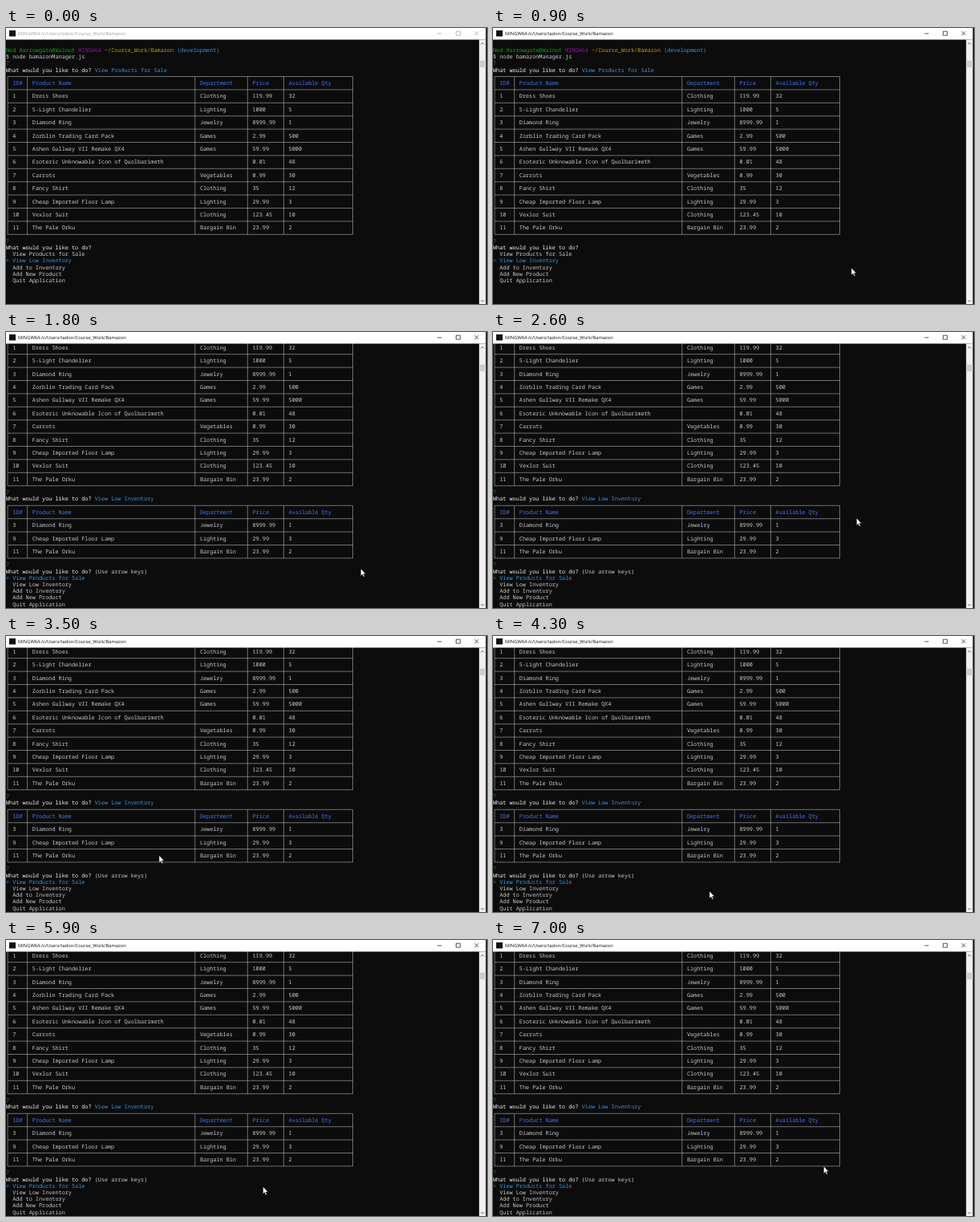
An HTML page that plays this animation: 600 px wide and 344 px high, repeating every 7100 ms.

```html
<!DOCTYPE html>
<html lang="en">
<head>
<meta charset="utf-8">
<title>Terminal inventory manager</title>
<style>
  html, body { margin: 0; width: 100%; height: 100%; overflow: hidden; background: #0c0c0c; }
  svg { display: block; width: 600px; height: 344px; }
  text { white-space: pre; text-rendering: geometricPrecision; }
  .mono { font: 6.833px "Noto Sans Mono", "DejaVu Sans Mono", monospace; }
  .title { font: 5.81px "Open Sans", "Noto Sans", sans-serif; }
</style>
</head>
<body>
<svg id="stage" viewBox="0 0 600 344"></svg>
<script>
const CELL = 4.1, ROW = 8.2, TOP = 27.7, LOOP = 7100, FOCUS_AT = 700, SCROLL_AT = 1800;
const WHITE = '#f2f2f2', GREY = '#cccccc', GREEN = '#13a10e', CYAN = '#3a96dd',
      BLUE = '#3b78ff', PURPLE = '#881798', YELLOW = '#c19c00';
const stage = document.getElementById('stage');

function add(parent, tag, attrs = {}, text = '') {
  const el = document.createElementNS('http://www.w3.org/2000/svg', tag);
  for (const key in attrs) el.setAttribute(key, attrs[key]);
  el.textContent = text;
  return parent.appendChild(el);
}

const lineY = line => TOP + line * ROW;
const put = (parent, line, col, text, fill) =>
  add(parent, 'text', { x: col * CELL, y: lineY(line) + 2.3, fill, class: 'mono' }, text);

const HEAD = ['ID#', 'Product Name', 'Department', 'Price', 'Available Qty'];
const PRODUCTS = [
  ['Dress Shoes', 'Clothing', '119.99', '32'],
  ['5-Light Chandelier', 'Lighting', '1000', '5'],
  ['Diamond Ring', 'Jewelry', '8999.99', '1'],
  ['Zorblin Trading Card Pack', 'Games', '2.99', '500'],
  ['Ashen Gullway VII Remake QX4', 'Games', '59.99', '5000'],
  ['Esoteric Unknowable Icon of Quolbarimeth', '', '0.01', '48'],
  ['Carrots', 'Vegetables', '0.99', '30'],
  ['Fancy Shirt', 'Clothing', '35', '12'],
  ['Cheap Imported Floor Lamp', 'Lighting', '29.99', '3'],
  ['Vexlor Suit', 'Clothing', '123.45', '10'],
  ['The Pale Orku', 'Bargain Bin', '23.99', '2']
].map((item, i) => [String(i + 1), ...item]);
const MENU = ['View Products for Sale', 'View Low Inventory', 'Add to Inventory',
              'Add New Product', 'Quit Application'];

function table(parent, line, items) {
  const edges = [0.5, 6.5, 57.5, 73.5, 84.5, 105.5].map(c => c * CELL);
  const rows = [HEAD, ...items];
  let d = '';
  for (let i = 0; i <= rows.length; i++) d += `M${edges[0]} ${lineY(line + 2 * i)}H${edges[5]}`;
  for (const x of edges) d += `M${x} ${lineY(line)}V${lineY(line + 2 * rows.length)}`;
  add(parent, 'path', { d, stroke: GREY, 'stroke-width': 0.52, fill: 'none' });
  rows.forEach((row, i) => row.forEach((text, j) =>
    put(parent, line + 1 + 2 * i, [2, 8, 59, 75, 86][j], text, i ? GREY : BLUE)));
}

function question(parent, line, answer = '', fill = CYAN) {
  put(parent, line, 0, '?', GREEN);
  put(parent, line + 1, 0, 'What would you like to do?', WHITE);
  put(parent, line + 1, 27, answer, fill);
}

function menu(parent, line, selected) {
  MENU.forEach((text, i) => {
    const on = i === selected;
    put(parent, line + i, 0, (on ? '> ' : '  ') + text, on ? CYAN : GREY);
  });
}

// Terminal contents
add(stage, 'rect', { width: 600, height: 344, fill: '#0c0c0c' });
const screen = add(stage, 'g');
put(screen, 0, 0, 'Ned Harrowgate@Walnut', GREEN);
put(screen, 0, 22, 'MINGW64', PURPLE);
put(screen, 0, 30, '~/Course_Work/Bamazon', YELLOW);
put(screen, 0, 52, '(development)', CYAN);
put(screen, 1, 0, '$ node bamazonManager.js', GREY);
question(screen, 2, MENU[0]);
table(screen, 4, PRODUCTS);

const before = add(screen, 'g');
question(before, 29);
menu(before, 31, 1);

const after = add(screen, 'g');
question(after, 29, MENU[1]);
table(after, 31, PRODUCTS.filter(p => +p[4] < 5));
question(after, 40, '(Use arrow keys)', GREY);
menu(after, 42, 0);

// Window frame
add(stage, 'rect', { width: 598.5, height: 14.5, fill: '#ffffff' });
add(stage, 'rect', { x: 4, y: 3, width: 8, height: 7.5, fill: '#111111' });
const caption = add(stage, 'g');
add(caption, 'text', { x: 15, y: 8.9, fill: 'currentColor', class: 'title' },
  'MINGW64:/c/Users/tadon/Course_Work/Bamazon');
add(caption, 'path', { d: 'M538 7H543.5M561.5 4.2h5v5h-5zM584.5 4.2l5 5m0-5l-5 5',
  stroke: 'currentColor', 'stroke-width': 0.7, fill: 'none' });
add(stage, 'rect', { x: 590.2, y: 14.5, width: 8.3, height: 329.5, fill: '#f0f0f0' });
add(stage, 'rect', { x: 590.2, y: 40.5, width: 8.3, height: 8.5, fill: '#cdcdcd' });
add(stage, 'path', { d: 'M592.4 20.4l1.9-1.9 1.9 1.9M592.4 339.2l1.9 1.9 1.9-1.9',
  stroke: '#505050', 'stroke-width': 0.9, fill: 'none' });

const pointer = add(stage, 'path', { d: 'M0 0V8.9L2 7.1 3.4 10.2 4.8 9.6 3.4 6.6H6.2Z',
  fill: '#ffffff', stroke: '#000000', 'stroke-width': 0.4 });

// Pointer stops: time, x, y
const PATH = [
  [400, 500, 345], [700, 452, 303], [900, 447, 299], [1100, 446, 307], [1400, 442.5, 295],
  [2300, 442.5, 295], [2600, 453.5, 232], [3100, 397, 248], [3500, 191, 273.5],
  [3900, 110, 297], [4300, 270, 318], [4700, 421, 325], [5100, 126, 296],
  [5500, 150, 308], [5800, 290, 316], [6200, 412.5, 282]
];

function pointerAt(t) {
  const i = PATH.findIndex(p => p[0] > t);
  if (i < 0) return PATH[PATH.length - 1].slice(1);
  if (i === 0) return PATH[0].slice(1);
  const [t0, x0, y0] = PATH[i - 1], [t1, x1, y1] = PATH[i];
  const k = (t - t0) / (t1 - t0);
  return [x0 + (x1 - x0) * k, y0 + (y1 - y0) * k];
}

function draw(now) {
  const t = Math.floor(now % LOOP / 100) * 100;
  const scrolled = t >= SCROLL_AT;
  caption.setAttribute('color', t < FOCUS_AT ? '#a0a0a0' : '#111111');
  screen.setAttribute('transform', `translate(0 ${scrolled ? -8 * ROW : 0})`);
  before.setAttribute('visibility', scrolled ? 'hidden' : 'visible');
  after.setAttribute('visibility', scrolled ? 'visible' : 'hidden');
  pointer.setAttribute('transform', `translate(${pointerAt(t)})`);
  requestAnimationFrame(() => draw(performance.now()));
}
draw(performance.now());
</script>
</body>
</html>
```
